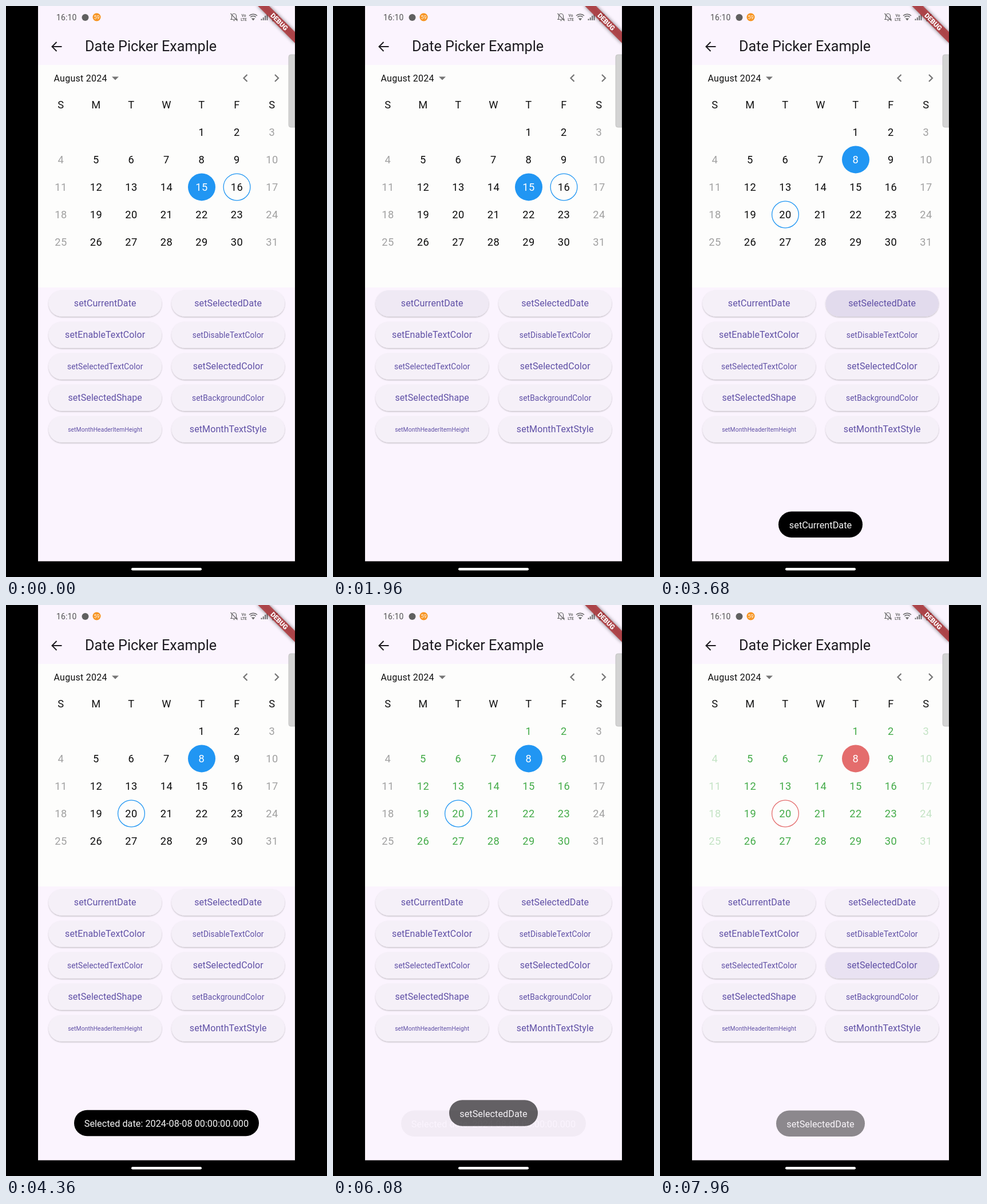
Write an HTML page that moves like this. It is 561x998 px and loops after 8000 ms.

```html
<!DOCTYPE html>
<html lang="en">
<head>
<meta charset="utf-8">
<title>Date Picker Example</title>
<style>
html, body { margin: 0; width: 100%; height: 100%; overflow: hidden; background: #000; }
svg { display: block; width: 561px; height: 998px; font-family: Roboto, sans-serif; }
.mid { text-anchor: middle; }
.day { font-size: 18.3px; letter-spacing: .5px; }
.label { fill: #6050a6; letter-spacing: .1px; }
.line { fill: none; stroke: #666; }
</style>
</head>
<body>
<svg id="stage" viewBox="0 0 561 998">
  <defs>
    <clipPath id="screen"><rect x="56" width="449" height="970.5"/></clipPath>
    <filter id="lift" x="-10%" y="-20%" width="120%" height="150%">
      <feDropShadow dx="0" dy="1.2" stdDeviation=".9" flood-opacity=".26"/>
    </filter>
    <filter id="soft" x="-20%" y="-100%" width="140%" height="300%">
      <feGaussianBlur stdDeviation="3"/>
    </filter>
  </defs>
  <rect width="561" height="998"/>
  <g clip-path="url(#screen)">
    <rect x="56" width="449" height="971" fill="#fbf4fe"/>
    <rect x="56" y="103" width="449" height="389" fill="#fdfdfc"/>

    <!-- status bar -->
    <text x="88" y="25" font-size="14" letter-spacing=".1" fill="#555">16:10</text>
    <circle cx="138.500" cy="20" r="6" fill="#606060"/>
    <circle cx="158.500" cy="19.500" r="7" fill="#f7931e"/>
    <text class="mid" x="158.500" y="23" font-size="9" fill="#fff">59</text>
    <g class="line" stroke-width="1.2">
      <path d="M393 23.500h11l-1.500-2v-4a4 4 0 0 0-8 0v4zM397 25.500h3M392.500 13l12 13"/>
      <path d="M425 17a10 10 0 0 1 14 0M427.300 19.500a6.500 6.500 0 0 1 9.400 0" stroke-width="1.500"/>
      <path d="M430 22h4l-2 2.500z" fill="#666"/>
      <path d="M446.500 25v-2.500M449.800 25v-5M453.100 25v-8M456.400 25v-11" stroke-width="1.900"/>
    </g>
    <g class="mid" font-size="6.500" font-weight="700" fill="#666">
      <text x="415.500" y="19">Vo</text><text x="415.500" y="25.500">LTE</text>
    </g>
    <path d="M465.500 14h2.500v-1.500h4V14h2.500v12.500h-9z" fill="#222"/>

    <!-- app bar and month header -->
    <path d="M97.500 71H80.500M88.500 63l-8 8 8 8" fill="none" stroke="#1d1b20" stroke-width="2"/>
    <text x="138" y="79" font-size="25.200" fill="#1d1b20">Date Picker Example</text>
    <text x="83.500" y="132" font-size="16" letter-spacing=".25" fill="#111">August 2024</text>
    <path d="M185 123.500h12l-6 6z" fill="#757575"/>
    <path d="M421.500 120l-6 6 6 6M470 120l6 6-6 6" fill="none" stroke="#757575" stroke-width="2.200"/>

    <g id="calendar"></g>
    <g id="buttons"></g>
    <path d="M505 85h-7a4 4 0 0 0-4 4v119a4 4 0 0 0 4 4h7z" fill="#d3d3d3" stroke="#bebebe" stroke-width=".8"/>
    <g transform="translate(505 0) rotate(45)">
      <rect x="-46" y="32" width="92" height="13.800" opacity=".5" filter="url(#soft)"/>
      <rect x="-46" y="32" width="92" height="13.800" fill="#b13c40" fill-opacity=".88"/>
      <text class="mid" y="43" font-size="11.700" font-weight="900" fill="#fff">DEBUG</text>
    </g>
    <g id="toasts"></g>
  </g>
  <rect x="219" y="982" width="123" height="4.500" rx="2.250" fill="#fff"/>
</svg>
<script>
const LOOP = 8000;
const BLUE = '#2196f3', RED = '#e46d6d', GREEN = '#43ab48';
const clamp = v => Math.max(0, Math.min(1, v));

function add(parent, tag, attrs, text) {
  const el = document.createElementNS('http://www.w3.org/2000/svg', tag);
  set(el, attrs);
  if (text !== undefined) el.textContent = text;
  parent.append(el);
  return el;
}
function set(el, attrs) {
  for (const key in attrs) el.setAttribute(key, attrs[key]);
}
const group = id => document.getElementById(id);

// Calendar: the first of the month falls on a Thursday.
const calendar = group('calendar');
const colX = col => 96 + col * 61.5;
const rowY = row => 172.3 + row * 48.05;
const place = date => ({ cx: colX((date + 3) % 7), cy: rowY(1 + Math.floor((date + 3) / 7)) });
const disc = add(calendar, 'circle', { r: 24 });
const ring = add(calendar, 'circle', { r: 23.4, fill: 'none', 'stroke-width': 1.3 });
[...'SMTWTFS'].forEach((name, col) =>
  add(calendar, 'text', { class: 'mid day', x: colX(col), y: rowY(0) + 6.5, fill: '#111' }, name));
const days = Array.from({ length: 31 }, (_, i) => {
  const { cx, cy } = place(i + 1);
  return add(calendar, 'text', { class: 'mid day', x: cx, y: cy + 6.5 }, i + 1);
});

// Buttons: label, font size
const buttons = [
  ['setCurrentDate', 16], ['setSelectedDate', 16],
  ['setEnableTextColor', 16], ['setDisableTextColor', 13.75],
  ['setSelectedTextColor', 13.75], ['setSelectedColor', 16],
  ['setSelectedShape', 16], ['setBackgroundColor', 13.75],
  ['setMonthHeaderItemHeight', 10.3], ['setMonthTextStyle', 16]
].map(([label, size], i) => {
  const x = i % 2 ? 289.5 : 74.5, y = 497 + Math.floor(i / 2) * 55;
  const pill = { x, y, width: 197.5, height: 45.8, rx: 22.9 };
  const parent = group('buttons');
  add(parent, 'rect', { ...pill, fill: '#f5f0f8', filter: 'url(#lift)' });
  const ink = add(parent, 'rect', { ...pill, fill: '#6750a4', opacity: 0 });
  add(parent, 'text', { class: 'mid label', x: x + 98.7, y: y + 23 + size * .34, 'font-size': size }, label);
  return ink;
});

// Button presses: button index, start; the setting applies on release.
const presses = [[0, 1740], [1, 3360], [2, 4920], [3, 6320], [5, 7480]];
const RELEASE = 280;

function inkLevel(t) {
  return t < 360 ? clamp((t - 100) / 200) ** 2 : clamp((680 - t) / 320);
}

// Toasts: text, width, entry, exit
const toasts = [
  ['setCurrentDate', 147, 2100, 3990],
  ['Selected date: 2024-08-08 00:00:00.000', 323, 4060, 5888],
  ['setSelectedDate', 155, 5960, 7850]
].map(([text, width, enter, exit]) => {
  const el = add(group('toasts'), 'g', { opacity: 0 });
  add(el, 'rect', { x: 280.5 - width / 2, y: 883.5, width, height: 45.5, rx: 22.75 });
  add(el, 'text', { class: 'mid', x: 280.5, y: 913, 'font-size': 16.3, fill: '#f6f6f6' }, text);
  return { el, enter, exit };
});

function draw(now) {
  const t = now % LOOP;
  const [current, selected, enabled, disabled, accent] = presses.map(p => t >= p[1] + RELEASE);

  for (const [i, start] of presses) set(buttons[i], { opacity: .13 * inkLevel(t - start) });

  const chosen = selected ? 8 : 15;
  const color = accent ? RED : BLUE;
  set(disc, { ...place(chosen), fill: color });
  set(ring, { ...place(current ? 20 : 16), stroke: color });
  days.forEach((el, i) => {
    const weekend = (i + 4) % 7 % 6 === 0;
    const fill = i + 1 === chosen ? '#fff'
      : weekend ? (disabled ? '#c3e3c4' : '#a0a0a0')
      : enabled ? GREEN : '#0c0c0c';
    set(el, { fill });
  });

  for (const { el, enter, exit } of toasts) {
    const opacity = clamp((t - enter) / 200) * clamp(1 - (t - exit) / 200);
    const drop = -54 * (1 - clamp((t - enter) / 400)) ** 3;
    set(el, { opacity, transform: `translate(0 ${drop})` });
  }
}

const begin = performance.now();
function tick() {
  draw(performance.now() - begin);
  requestAnimationFrame(tick);
}
tick();
</script>
</body>
</html>
```
